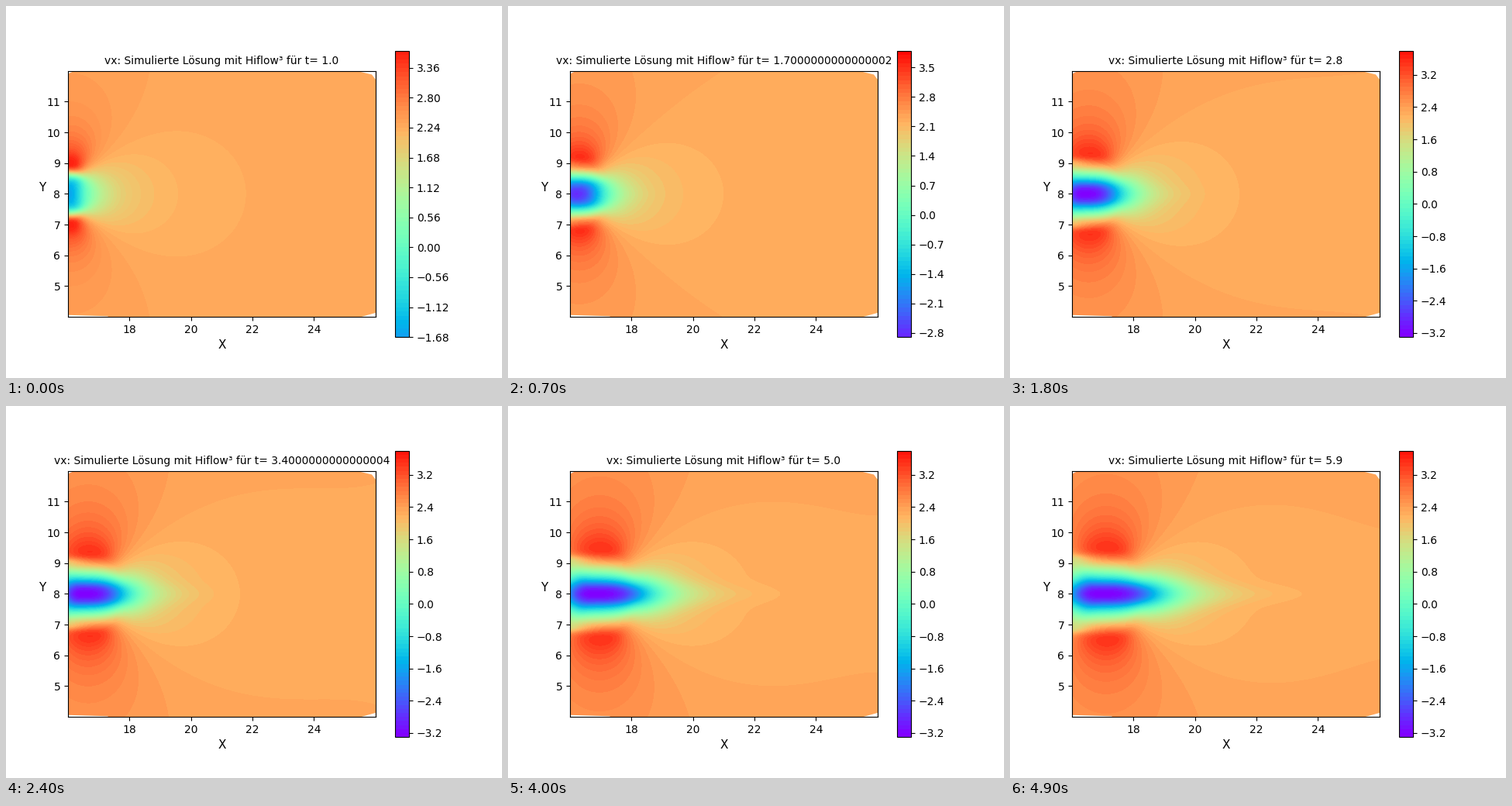
Animation, 640 px wide and 480 px high, one loop 5000 ms. Source, as a matplotlib script:

```python
import numpy as np
import matplotlib.pyplot as plt
from matplotlib.animation import FuncAnimation

FRAMES, INTERVAL, DT = 50, 100, 0.1
LAST_STEP = 48          # the solution stays unchanged after this step
VMIN, VMAX = -3.22, 3.95
CORE = 0.2              # smoothing radius of the vortex sheets

x = np.linspace(16, 26, 161)
y_half = np.linspace(0, 4, 65)
y = np.linspace(4, 12, 129)

# White gaps at the rim of the mesh.
CORNERS = [
    [(25.38, 12), (25.88, 11.88), (26, 11.72), (26, 12)],
    [(26, 4.13), (25.53, 4), (26, 4)],
    [(16, 4.06), (17.3, 4.02), (17.3, 4), (16, 4)],
    [(16, 11.9), (16.2, 12), (16, 12)],
]


def grow(tau, start, end, scale):
    """Exponential approach from start to end."""
    return end + (start - end) * np.exp(-tau / scale)


def value_range(tau):
    low = -3.299 + 1.66 * np.exp(-((tau / 0.57) ** 1.4))
    high = 3.74 + 0.24 * np.exp(-1.1 * tau) * np.sin(3.2 * (tau - 0.12))
    return low, high


def contour_levels(tau):
    low, high = value_range(tau)
    size = 0.08 if high - low < 6.48 else 0.1
    return np.arange(np.floor(low / size), np.ceil(high / size) + 1) * size


def inflow(tau):
    return grow(tau, 2.29, 2.37, 2.4)


def wake_center(tau):
    return 16.05 + 0.19 * tau


def sheet(dx, dy, half):
    """Velocity of a smoothed vortex sheet of unit strength."""
    r = np.sqrt(dy**2 + CORE**2)
    return dy / r * (np.arctan((dx + half) / r) - np.arctan((dx - half) / r)) / (2 * half)


def outer_flow(px, py, tau):
    """Uniform inflow plus two thick shear layers, the inner part reaching further back."""
    layers = np.linspace(grow(tau, 0.5, 0.25, 1.2), grow(tau, 0.85, 1.41, 3), 8)
    half = grow(tau, 0.3, 0.9, 0.9)
    shifts = np.linspace(0.7, 0, len(layers)) * half - 0.05
    dipole = grow(tau, 1.65, 3.75, 1.5)
    pair = 0
    for b, shift in zip(layers, shifts):
        dx = px - wake_center(tau) - shift
        pair = pair + sheet(dx, py - b, half) - sheet(dx, py + b, half)
    outlet = 0.02 * min(tau / 3, 1) * ((px - 16) / 10) ** 3
    return inflow(tau) + dipole / (2 * layers.sum()) * pair - outlet


def wake(px, py, tau):
    """Narrow deficit that brings the axis down to a bell-shaped profile."""
    length = 0.65 + 0.48 * tau**0.73
    s = (x - wake_center(tau)) / length
    s = np.where(s < 0, -1.7 * s, s)
    depth = inflow(tau) - value_range(tau)[0] - 0.04
    axis = inflow(tau) - depth / (1 + s ** grow(tau, 2, 3.2, 1))
    deficit = np.maximum(outer_flow(x, 0.0, tau) - axis, 0)
    width = grow(tau, 0.36, 0.55, 1.8)
    width = width + (0.3 - width) * np.clip((s - 1.2) / 1.2, 0, 1)
    return deficit * np.exp(-((py / width) ** 2))


def velocity(tau):
    px, py = np.meshgrid(x, y_half)
    dip = np.exp(-(((px - 16) / 0.7) ** 2) - ((py - 0.98 - 0.04 * tau) / 0.13) ** 2)
    u = outer_flow(px, py, tau) - wake(px, py, tau) - grow(tau, 0, 0.4, 0.4) * dip
    low, high = value_range(tau)
    u = high - 0.08 * np.logaddexp(0, (high - u) / 0.08)
    u = np.maximum(u, low)
    return np.vstack([u[:0:-1], u])


fig = plt.figure(figsize=(6.4, 4.8), dpi=100)


def draw(frame):
    tau = min(frame, LAST_STEP) * DT
    fig.clear()
    ax = fig.add_subplot()
    filled = ax.contourf(x, y, velocity(tau), contour_levels(tau),
                         cmap="rainbow", vmin=VMIN, vmax=VMAX)
    for corner in CORNERS:
        ax.add_patch(plt.Polygon(corner, facecolor="white", lw=0, zorder=2))
    ax.set(xlim=(16, 26), ylim=(4, 12), aspect="equal",
           xticks=range(18, 26, 2), yticks=range(5, 12))
    ax.set_xlabel("X", fontsize=11)
    ax.set_ylabel("Y", rotation=0, fontsize=11)
    ax.set_title(f"vx: Simulierte Lösung mit Hiflow³ für t= {1 + frame * DT}", fontsize=10)
    fig.colorbar(filled, ax=ax)
    return []


anim = FuncAnimation(fig, draw, frames=FRAMES, interval=INTERVAL,
                     init_func=lambda: [], repeat=True, repeat_delay=0)
plt.show()
```
